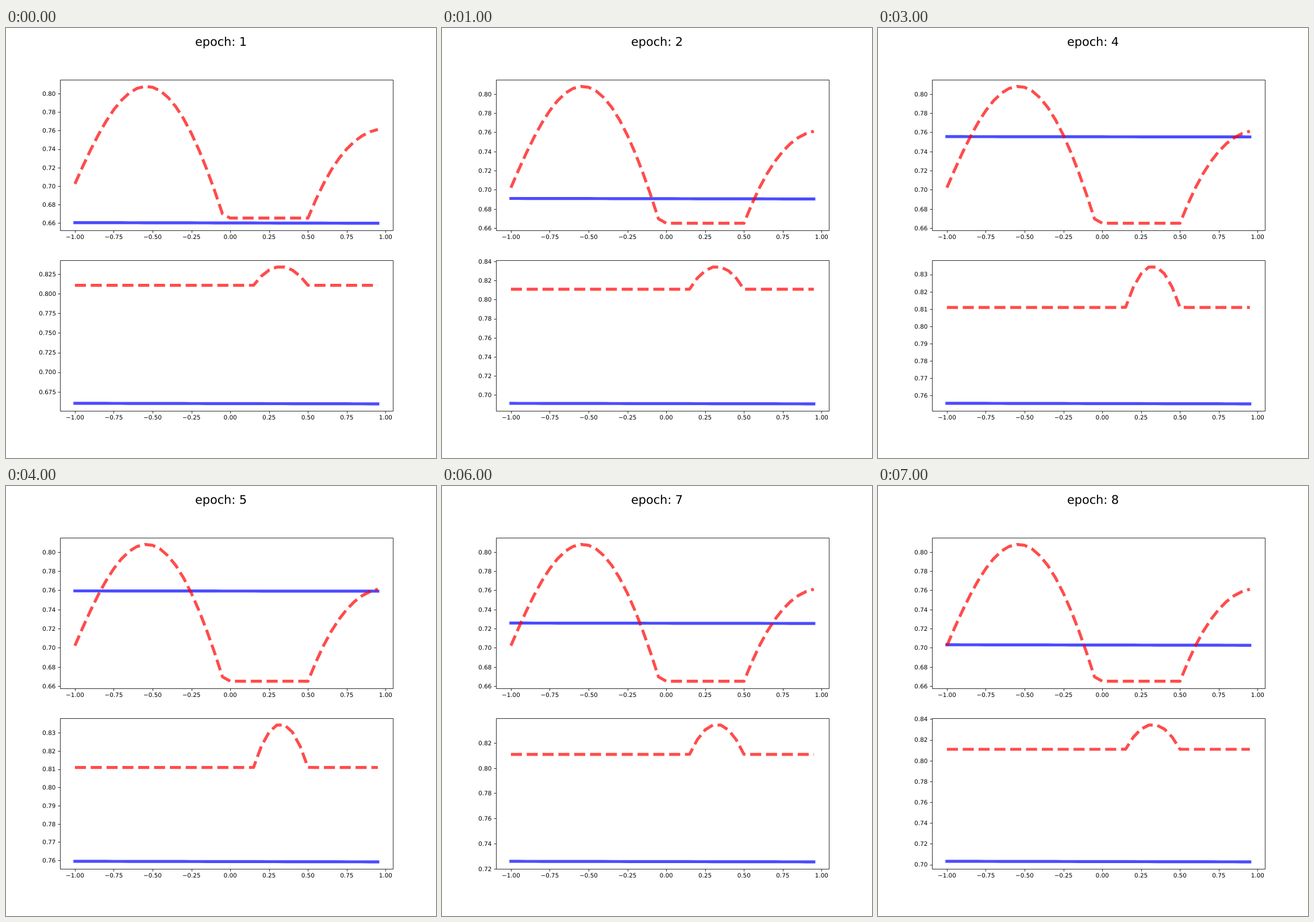
Recreate the animation shown at these times as an HTML page. Size 748 by 748 pixels, loop 8000 ms.

```html
<!DOCTYPE html>
<html lang="en">
<head>
<meta charset="utf-8">
<title>Training curves</title>
<style>
  html, body { margin: 0; width: 100%; height: 100%; overflow: hidden; background: #fff; }
  svg { display: block; width: 748px; height: 748px; }
  text { font: 10.39px "DejaVu Sans", sans-serif; text-rendering: geometricPrecision; }
  .title { font-size: 20.78px; }
  .mid { text-anchor: middle; }
  .axis { fill: none; stroke: #000; stroke-width: .83; }
  .line { fill: none; stroke-width: 5.195; stroke-opacity: .7; stroke-linejoin: round; }
  .fit { stroke: #00f; stroke-linecap: square; }
  .goal { stroke: #f00; stroke-dasharray: 19.22 8.312; }
</style>
</head>
<body>
<svg id="stage" viewBox="0 0 748 748"></svg>
<script>
const stage = document.getElementById('stage');
const LEFT = 93.5, RIGHT = 673.2, HEIGHT = 261.8, EM = 10.39, EPOCH_MS = 1000;
const xs = Array.from({ length: 40 }, (_, i) => -1 + i * .05);

// Two humps with a flat floor between them
function twoHumps(x) {
  const d = x + .54, e = 1 - x;
  const hump = x < .25
    ? .808 - d * d * (.6085 + .09 * d - .317 * d * d)
    : .762 - e * e * (.31 + .16 * e);
  return Math.max(.665, hump);
}
const oneHump = x => Math.max(.8109, .8347 - .775 * (x - .325) ** 2);

// Level of the fitted line after each epoch, and its slight downward tilt
const levels = [.6594, .6904, .7284, .7552, .7591, .7469, .7254, .7026];
const fitAt = epoch => {
  const drop = .0003 + .000025 * (epoch - 4) ** 2;
  return x => levels[epoch] + drop * (.95 - x) / 1.95;
};

const px = x => LEFT + (x + 1.0975) / 2.145 * (RIGHT - LEFT);
const snap = v => Math.round(v) + .5;
const path = (cls, d) => `<path class="${cls}" d="${d}"/>`;
const label = (cls, x, y, s) => `<text class="${cls}" x="${x}" y="${y}">${s}</text>`;

function tickStep(span) {
  const raw = span / 9, mag = 10 ** Math.floor(Math.log10(raw));
  return [1, 2, 2.5, 5, 10].find(m => m * mag >= raw) * mag;
}

function panel(goal, fit, top) {
  const values = [...xs.map(goal), ...xs.map(fit)];
  const min = Math.min(...values), max = Math.max(...values);
  const pad = (max - min) * .05, lo = min - pad, hi = max + pad;
  const py = v => top + (hi - v) / (hi - lo) * HEIGHT;
  const series = (cls, f) => path('line ' + cls,
    'M' + xs.map(x => `${px(x).toFixed(3)} ${py(f(x)).toFixed(3)}`).join('L'));

  const bottom = top + HEIGHT, x0 = snap(LEFT), y1 = snap(bottom);
  let ticks = '', labels = '';
  for (let x = -1; x <= 1; x += .25) {
    ticks += `M${snap(px(x))} ${y1}v4`;
    labels += label('mid', px(x), Math.round(bottom + 15.17),
      (x < 0 ? '\u2212' : '') + Math.abs(x).toFixed(2));
  }

  const step = tickStep(hi - lo), digits = Math.abs(step - .025) < 1e-6 ? 3 : 2;
  const width = (.636 * (digits + 1) + .318 - .132) * EM;
  const labelX = Math.round(LEFT - 7.27 - width) - .066 * EM;
  for (let n = Math.ceil(lo / step); n * step <= hi; n++) {
    const y = py(n * step);
    ticks += `M${x0} ${snap(y)}h-4`;
    labels += label('', labelX, Math.round(y + 3.95), (n * step).toFixed(digits));
  }
  const frame = `M${x0} ${snap(top)}H${snap(RIGHT)}V${y1}H${x0}Z`;
  return series('fit', fit) + series('goal', goal) + path('axis', frame + ticks) + labels;
}

function draw(epoch) {
  const fit = fitAt(epoch);
  stage.innerHTML = label('title mid', 374, 31, `epoch: ${epoch + 1}`) +
    panel(twoHumps, fit, 89.76) + panel(oneHump, fit, 403.92);
}

let shown = 0, start;
function tick(now) {
  start ??= now;
  const epoch = Math.floor((now - start) / EPOCH_MS) % levels.length;
  if (epoch !== shown) draw(shown = epoch);
  requestAnimationFrame(tick);
}
draw(0);
requestAnimationFrame(tick);
</script>
</body>
</html>
```
